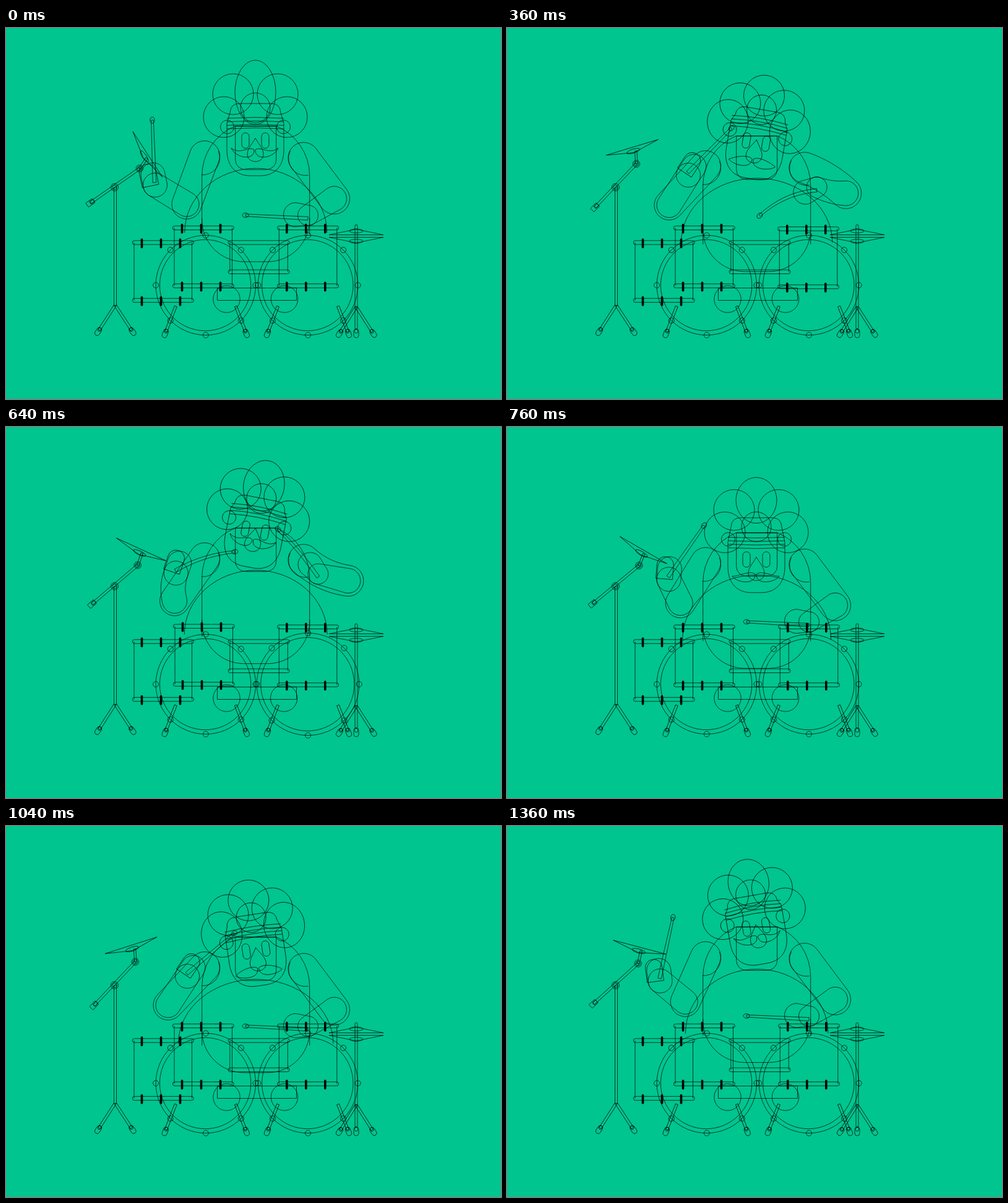
These frames come from a looping animation (800 by 600 pixels, 1.4 s). An HTML page with a canvas:

```html
<!DOCTYPE html>
<html lang="en">
<head>
<meta charset="utf-8">
<title>Drummer</title>
<style>
html, body { margin: 0; width: 100%; height: 100%; overflow: hidden; background: #00c58e; }
canvas { display: block; }
</style>
</head>
<body>
<canvas id="stage" width="800" height="600"></canvas>
<script>
const ctx = document.getElementById('stage').getContext('2d');
const LOOP = 1400, BEAT = 700, STEP = 40, RAD = Math.PI / 180, TAU = Math.PI * 2;

const mix = (a, b, u) => a + (b - a) * u;
function smooth(a, b, t) {
  const u = Math.min(1, Math.max(0, (t - a) / (b - a)));
  return u * u * (3 - 2 * u);
}
const arch = (a, b, t) => t > a && t < b ? Math.sin(Math.PI * (t - a) / (b - a)) : 0;
const pulse = (a, b, t) => Math.sqrt(arch(a, b, t));

function draw(fn) { ctx.beginPath(); fn(); ctx.stroke(); }
function at(x, y, deg, fn) {
  ctx.save();
  ctx.translate(x, y);
  ctx.rotate(deg * RAD);
  fn();
  ctx.restore();
}
const oval = (x, y, rx, ry = rx) => draw(() => ctx.ellipse(x, y, rx, ry, 0, 0, TAU));
const box = (x, y, w, h, r = 0) => draw(() => ctx.roundRect(x, y, w, h, r));
const poly = (...p) => draw(() => { p.forEach(q => ctx.lineTo(...q)); ctx.closePath(); });
const line = (x1, y1, x2, y2) => draw(() => { ctx.moveTo(x1, y1); ctx.lineTo(x2, y2); });
function bar(x1, y1, x2, y2, w) {
  at(x1, y1, Math.atan2(y2 - y1, x2 - x1) / RAD, () => box(0, -w / 2, Math.hypot(x2 - x1, y2 - y1), w));
}

// Tapered limb along a quadratic curve; round ends unless flat.
function tube(a, b, bend, ra, rb, flat) {
  const dx = b[0] - a[0], dy = b[1] - a[1], len = Math.hypot(dx, dy) || 1;
  const c = [(a[0] + b[0]) / 2 - dy / len * bend, (a[1] + b[1]) / 2 + dx / len * bend];
  const dirA = Math.atan2(c[1] - a[1], c[0] - a[0]), dirB = Math.atan2(b[1] - c[1], b[0] - c[0]);
  const side = s => {
    for (let i = 0; i <= 12; i++) {
      const u = (s > 0 ? i : 12 - i) / 12, v = 1 - u;
      const x = v * v * a[0] + 2 * u * v * c[0] + u * u * b[0];
      const y = v * v * a[1] + 2 * u * v * c[1] + u * u * b[1];
      const d = Math.atan2(v * (c[1] - a[1]) + u * (b[1] - c[1]), v * (c[0] - a[0]) + u * (b[0] - c[0]));
      const r = s * mix(ra, rb, u);
      ctx.lineTo(x - Math.sin(d) * r, y + Math.cos(d) * r);
    }
  };
  draw(() => {
    side(1);
    if (!flat) ctx.arc(b[0], b[1], rb, dirB + Math.PI / 2, dirB - Math.PI / 2, true);
    side(-1);
    if (!flat) ctx.arc(a[0], a[1], ra, dirA - Math.PI / 2, dirA - Math.PI * 1.5, true);
    ctx.closePath();
  });
  return dirB;
}

function leg(x, y, fx, fy) {
  const deg = Math.atan2(fy - y, fx - x) / RAD, len = Math.hypot(fx - x, fy - y);
  at(x, y, deg, () => {
    box(0, -2, len - 3, 4);
    box(len - 7, -4, 14, 8, 4);
    box(len - 7, -2.5, 6, 5, 2);
  });
}
function drum(x, y, h, lugs) {
  line(x, y, x, y + h);
  line(x + 93.5, y, x + 93.5, y + h);
  for (const ry of [y, y + h]) {
    box(x - 2.7, ry - 3.2, 99, 6.4, 3.2);
    if (!lugs) continue;
    ctx.save();
    ctx.lineWidth = 3.6;
    ctx.lineCap = 'round';
    for (let i = 0; i < 3; i++) line(x + 12.5 + i * 31, ry - 5, x + 12.5 + i * 31, ry + 7.5);
    ctx.restore();
  }
}
function bass(x, scale) {
  const r = 80.7 * scale;
  oval(x, 416, r);
  oval(x - .7, 416, 73.7 * scale);
  for (let i = 0; i < 8; i++) oval(x + r * Math.cos(i * TAU / 8), 416 + r * Math.sin(i * TAU / 8), 4.5);
  leg(x - 48.5, 450, x - 65.5, 494);
  leg(x + 48.5, 450, x + 65.5, 494);
}
function plate(flip) {
  poly([-44, 0], [44, 0], [0, 9 * flip]);
  oval(0, 6.3 * flip, 11, 3.2);
}

function crashStand(angle) {
  const up = Math.max(angle, 0), down = Math.min(angle, 0), s = Math.sin(angle * RAD);
  const boom = -46.6 + up * .17 + down * .11;
  const hx = 175.5, hy = 257.5;
  const px = hx + 50.5 * Math.cos(boom * RAD), py = hy + 50.5 * Math.sin(boom * RAD);
  const x = 208 + s * (angle > 0 ? 25 : 19.5), y = 193 + up * .2;
  bar(176.5, hy, 176.5, 449, 4);
  leg(176, 449, 149, 491);
  leg(177, 449, 204.5, 491);
  oval(hx, hy, 6);
  oval(hx, hy, 3.7);
  at(hx, hy, boom + 2, () => {
    box(-46, -3.7, 96, 4);
    box(-53, -5.7, 13, 8, 1);
    box(-47, -4.2, 7, 5, 1);
  });
  oval(px, py, 5.7);
  oval(px, py, 3.6);
  bar(px + .5, py, x - s * 6.5 + 4, y + 6, 3.5);
  at(x, y, angle, () => plate(1));
}
function hiHat() {
  box(564, 318, 4, 169, 2);
  leg(566, 451, 539, 494);
  leg(566, 451, 593.5, 494);
  box(562, 486.5, 8, 14.5, 4);
  box(563.5, 487.5, 5, 6, 2);
  at(566, 334.5, 0, () => plate(-1));
  at(566, 338.5, 0, () => plate(1));
}

function torso(y) {
  const s = y + 12, x = 403.7, r = 87, cut = Math.acos(33 / r);
  draw(() => {
    ctx.moveTo(x - r, y + 107);
    ctx.arc(x, s, r, Math.PI, Math.PI + cut);
    ctx.arc(x, s, r, -cut, 0);
    ctx.lineTo(x + r, y + 107);
  });
  draw(() => {
    ctx.moveTo(x - r, y + 80);
    ctx.arcTo(x - r, y + 151, x, y + 151, 68);
    ctx.arcTo(x + r, y + 151, x + r, y + 80, 68);
    ctx.lineTo(x + r, y + 80);
  });
  draw(() => ctx.ellipse(x, y + 104, 115 + .6 * Math.max(0, y - 231), 104, 0, Math.PI, TAU));
  box(x - 33, s - 80, 66, 70, [0, 0, 16, 16]);
}

function stick(x, y, deg, bend) {
  const tip = [x + 101 * Math.cos(deg * RAD), y + 101 * Math.sin(deg * RAD)];
  const dir = tube([x, y], tip, bend, 2.8, 1.8, true);
  at(...tip, dir / RAD, () => oval(0, 0, 5, 3.7));
}
const ahead = (p, dir, d) => [p[0] + d * Math.cos(dir), p[1] + d * Math.sin(dir)];

function leftArm(belly, m) {
  const shoulder = [321, belly - 20];
  const elbow = [mix(262, 292, m.swing), mix(284 + .65 * (belly - 239), 285, m.swing)];
  const wrist = [mix(293, 241, m.swing), mix(belly - 5, 254, m.swing)];
  const hand = (Math.atan2(wrist[1] - elbow[1], wrist[0] - elbow[0]) - 55 * RAD) / 2;
  tube(shoulder, elbow, 0, 24.5, 24);
  draw(() => ctx.arc(shoulder[0] - 3, shoulder[1] + 3, 27.5, -.4, 1.65));
  tube(elbow, wrist, -7 * m.snap, 20, 19.5);
  tube(wrist, ahead(wrist, hand, 17), 0, 19.5, 19.5);
  at(...wrist, hand / RAD + 90, () => box(-21, -36, 27, 36, [13, 13, 0, 0]));
  stick(wrist[0] - 1, wrist[1] - 4, mix(-62 + 30 * m.crouch, -92, m.swing ** 4) + 40 * m.snap, -11 * m.snap);
}
function rightArm(belly, m) {
  const shoulder = [481, belly - 17], out = m.raise ** 2;
  const elbow = [mix(530.5, 562, out), belly + mix(49, 4, out)];
  const wrist = [mix(488, 511, out), belly + mix(76, -7, m.raise)];
  const deg = 183 - 27 * m.lift + 47 * m.snap;
  tube(shoulder, elbow, 12 * m.snap - 8 * m.lift, 25, 25);
  draw(() => ctx.arc(shoulder[0] + 3, shoulder[1] + 1, 27.5, 1.4, 3.6));
  tube(elbow, wrist, -5 * m.lift, 20, 16.5);
  tube(wrist, ahead(wrist, deg * RAD, 20), 0, 16.5, 19.5);
  stick(wrist[0], wrist[1] + 5, deg, 17 * m.lift + 5 * m.snap);
}

function moustache(side, d) {
  ctx.save();
  ctx.scale(side, 1);
  draw(() => {
    ctx.moveTo(-1, -5);
    ctx.bezierCurveTo(-9, -12, -30 - 6 * d, -2 - 6 * d, -38, 8 * d);
    ctx.bezierCurveTo(-32, 8.5 + .5 * d, 0, 14, -1, -5);
  });
  ctx.restore();
}
function head(x, y, tilt, { nod, hair, droop }) {
  const k = Math.abs(hair), band = nod - 28, bow = Math.max(-3, band * .25);
  const top = -44 + .28 * nod, chin = 64 + .68 * nod, lip = nod + 31 + 11 * droop;
  at(x, y, tilt, () => {
    oval(0, -65 + 9 * k, 33, 33 + 19 * Math.max(0, hair));
    for (const s of [-1, 1]) {
      oval(s * 36, -46 - 7 * hair, 33);
      oval(s * 51, -10 - 10 * k + 4 * hair, 33, 33 + 13 * Math.max(0, -hair));
      oval(s * 45.5, 0, 11);
      box(s * 16 - 6, nod - 12.5, 12, 25, 6);
    }
    oval(0, nod - 53, 24);
    draw(() => {
      ctx.moveTo(-46, band);
      ctx.lineTo(-46, chin - 42);
      ctx.bezierCurveTo(-46, chin - 14, -30, chin, -8, chin);
      ctx.lineTo(8, chin);
      ctx.bezierCurveTo(30, chin, 46, chin - 14, 46, chin - 42);
      ctx.lineTo(46, band);
    });
    draw(() => {
      ctx.moveTo(-46, band);
      ctx.lineTo(-41, top + 15);
      ctx.quadraticCurveTo(-40, top, -26, top);
      ctx.lineTo(26, top);
      ctx.quadraticCurveTo(40, top, 41, top + 15);
      ctx.lineTo(46, band);
    });
    for (let i = 0; i < 4; i++) draw(() => {
      const by = band - 8 + i * 5.7;
      ctx.moveTo(-46, by);
      ctx.quadraticCurveTo(0, by + bow * 2, 46, by);
    });
    draw(() => {
      const ny = nod - 4;
      ctx.moveTo(0, ny);
      ctx.bezierCurveTo(4, ny + 8, 13, ny + 17, 13, ny + 26);
      ctx.bezierCurveTo(13, ny + 42, -13, ny + 42, -13, ny + 26);
      ctx.bezierCurveTo(-13, ny + 17, -4, ny + 8, 0, ny);
    });
    at(-1, lip, 0, () => { moustache(1, droop); moustache(-1, droop); });
  });
}

// Two beats per loop: a cymbal hit, a crouch with a nod, then a sway to one side.
function motion(t) {
  const second = t >= BEAT, p = t % BEAT;
  const release = 1 - smooth(0, 140, p);
  const strike = release + smooth(second ? 640 : 590, BEAT, p);
  const dip = smooth(0, 140, p) * (1 - smooth(200, 420, p));
  return {
    strike, dip,
    crouch: (second ? 1.15 : .91) * smooth(0, 140, p) * (1 - p / BEAT) ** .7,
    cymbal: 57 * strike - 19 * arch(20, 540, p),
    tilt: (second ? -11 : 11) * smooth(150, 420, p) * (1 - smooth(650, BEAT, p)),
    swing: release + smooth(second ? 520 : 600, BEAT, p),
    raise: smooth(200, 440, t) * (1 - smooth(600, 760, t)),
    lift: pulse(150, 580, t),
    snap: pulse(580, 700, t),
    face: {
      nod: 6 + (second ? 43 : 38) * dip + 16 * strike,
      hair: strike - dip,
      droop: dip - release - smooth(500, 640, p)
    }
  };
}

function render(t) {
  const m = motion(t), belly = 227 + 29 * m.crouch;
  const kickL = pulse(90, 310, t), kickR = pulse(400, 720, t);
  const tap = pulse(110, 290, t);
  ctx.fillStyle = '#00c58e';
  ctx.fillRect(0, 0, 800, 600);
  ctx.strokeStyle = '#000';
  ctx.lineWidth = .7;

  head(403 + .2 * m.tilt, belly - 79 + 43 * m.dip + 12 * m.strike ** 2, m.tilt, m.face);
  torso(belly);
  leftArm(belly, m);
  rightArm(belly, m);

  crashStand(m.cymbal);
  hiHat();
  drum(207, 347, 93.5, true);
  drum(272 + tap + m.snap, 323.3 - tap - m.snap, 93.7, true);
  drum(441.3 + 2 * tap - m.lift, 323.3 - tap + 1.5 * m.lift, 93.7, true);
  drum(361.8, 347, 47.3, false);
  box(341.5, 420.5, 128, 20);
  oval(356.5 + kickL, 438.5, 21.7);
  oval(450 - kickR, 438.5, 21.7);
  bass(322.8, 1 + .03 * kickL);
  bass(488, 1 + .03 * kickR);
}

const start = performance.now();
function tick() {
  const t = (performance.now() - start) % LOOP;
  render(Math.floor(t / STEP) * STEP);
  requestAnimationFrame(tick);
}
tick();
</script>
</body>
</html>
```
